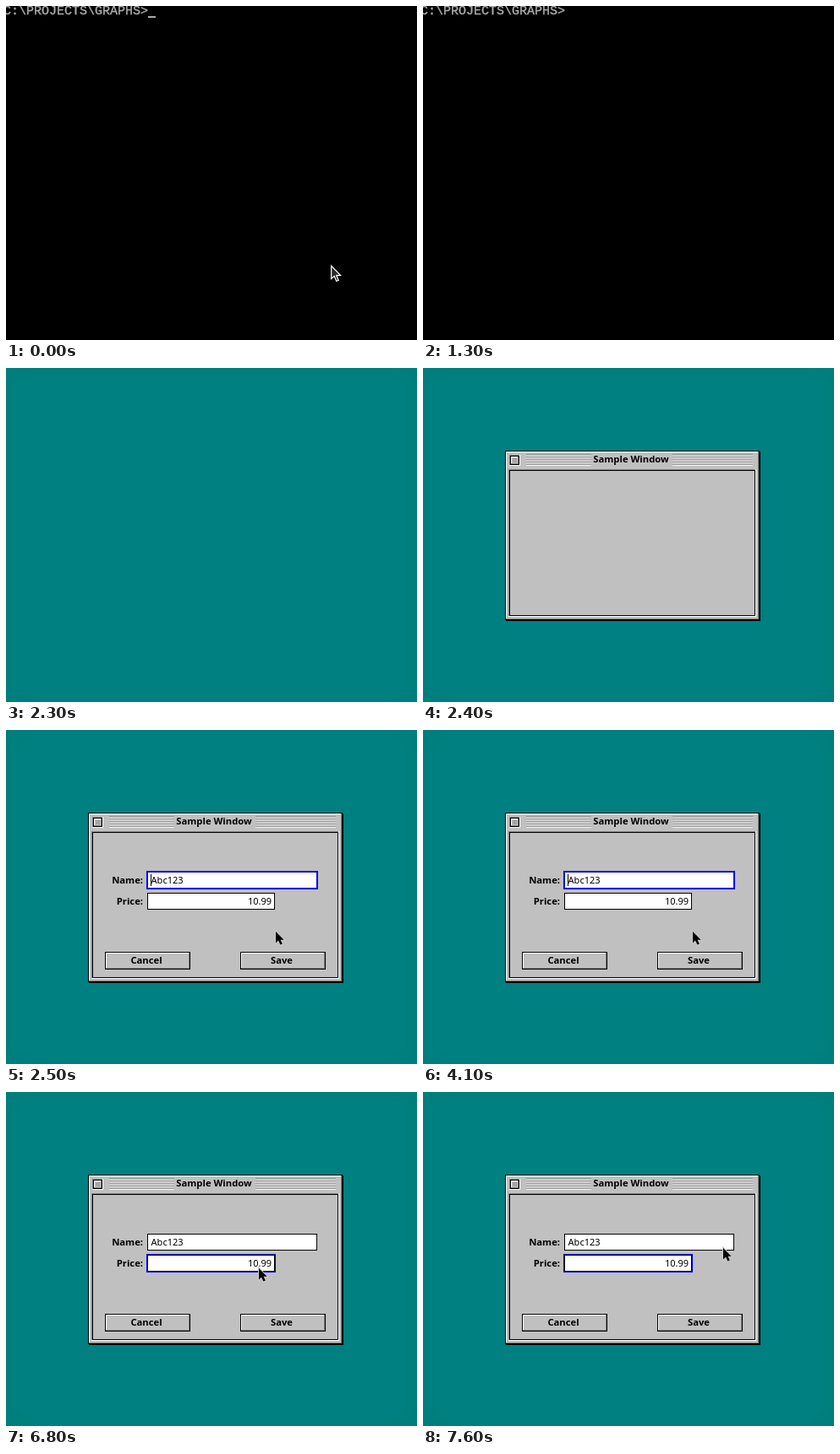
An HTML page for the animation above (8 s loop, 486 px wide and 396 px high).

```html
<!DOCTYPE html>
<html lang="en">
<head>
<meta charset="utf-8">
<title>Sample Window</title>
<style>
  html, body { margin: 0; width: 100%; height: 100%; overflow: hidden; background: #000; }
  svg { display: block; }
  #vignette { position: absolute; left: 0; top: 0; width: 486px; height: 396px; box-shadow: inset 0 0 20px rgba(0, 0, 0, .04); }
  .dos { font: 15px "Liberation Mono", monospace; fill: #aaa; stroke: #aaa; stroke-width: .4; }
  .label { font: bold 11.25px "Noto Sans", sans-serif; }
  .value { font: 11px "Noto Sans", sans-serif; }
  .middle { text-anchor: middle; }
  .end { text-anchor: end; }
</style>
</head>
<body>
<svg width="486" height="396" viewBox="0 0 486 396">
  <g id="dos">
    <text class="dos" x="-3" y="10">C:\PROJECTS\GRAPHS&gt;</text>
    <text class="dos" id="command" x="168" y="10">DEMO</text>
    <rect id="cursor" y="12" width="9" height="2" fill="#aaa"/>
    <path id="dosPointer" transform="translate(384 307)" fill="#2a2a2a" stroke="#fff" stroke-width="1.2"
      d="M.6 1V16.5L4.2 13.2L6.8 19.2L9.2 18.2L6.7 12.3H11.6Z"/>
  </g>
  <path id="strip" fill="#008080" d="M0 0H486V27H477V28H0Z"/>
  <rect id="desktop" width="486" height="396" fill="#008080"/>
  <g id="window" shape-rendering="crispEdges"></g>
  <g id="content" shape-rendering="crispEdges"></g>
  <path id="pointer" fill="#000" stroke="#c8c8c8" stroke-width="2" paint-order="stroke"
    d="M0 0V13.5L3 10.6L5.4 15.5L7.8 14.5L5.5 9.7H9.6Z"/>
</svg>
<div id="vignette"></div>
<script>
const LOOP = 8000, STEP = 100;
const el = id => document.getElementById(id);
const show = (id, on) => { el(id).style.display = on ? '' : 'none'; };

const rect = (x, y, w, h, fill, id = '') =>
  `<rect ${id && `id="${id}"`} x="${x}" y="${y}" width="${w}" height="${h}" fill="${fill}"/>`;
const text = (x, y, cls, str) => `<text x="${x}" y="${y}" class="${cls}">${str}</text>`;

// Box with a lit top left edge and a shaded bottom right edge.
const bevel = (x, y, w, h, light = '#fff', dark = '#808080') =>
  rect(x, y, w, h, dark) + rect(x, y, w - 1, h - 1, light) + rect(x + 1, y + 1, w - 2, h - 2, '#c0c0c0');
const sunken = (x, y, w, h) => bevel(x, y, w, h, '#808080', '#fff');

const framed = (x, y, w, h) => rect(x, y, w, h, '#000') + bevel(x + 1, y + 1, w - 2, h - 2);

const border = (x, y, w, h) => rect(x, y, w, h, '#000');
const focusRing = (id, x, y, w, h) => rect(x - 1, y - 1, w + 2, h + 2, '#0000dc', id);
const paper = (x, y, w, h) => rect(x + 1, y + 1, w - 2, h - 2, '#fff');

const button = (x, label) =>
  framed(x, 263, 101, 21) + text(x + 49, 277, 'label middle', label);

function stripes(x, width) {
  let out = '';
  for (let y = 102; y < 115; y += 2)
    out += rect(x, y, width, 1, '#808080') + rect(x, y + 1, width, 1, '#fff');
  return out;
}

const nameBox = [167, 168, 201, 20], priceBox = [167, 193, 151, 20];

el('window').innerHTML =
  rect(98, 99, 301, 201, '#000') + framed(97, 98, 301, 201) +
  stripes(122, 77) + stripes(295, 95) +
  text(246, 112, 'label middle', 'Sample Window') +
  sunken(102, 103, 13, 13) + rect(103, 104, 11, 11, '#000') +
  bevel(104, 105, 9, 9) + rect(106, 107, 5, 5, '#a4a4a4') +
  sunken(101, 120, 293, 175) +
  rect(102, 121, 291, 173, '#000') + rect(103, 122, 289, 171, '#c0c0c0');

el('content').innerHTML =
  text(162, 182, 'label end', 'Name:') + text(162, 207, 'label end', 'Price:') +
  border(...nameBox) + focusRing('nameFocus', ...nameBox) + paper(...nameBox) +
  focusRing('priceFocus', ...priceBox) + border(...priceBox) + paper(...priceBox) +
  text(171.6, 182, 'value', 'Abc123') + text(314, 207, 'value end', '10.99') +
  rect(171, 171, 1, 14, '#000', 'caret') +
  button(117, 'Cancel') + button(277, 'Save');

const caretToggles = [2500, 3200, 3700, 3800, 4100, 4400, 5000, 5300, 5600, 5900, 6200, 6500];

// Pointer path: time, x, y
const path = [[4900, 319, 239], [5400, 297, 217], [5800, 298, 210], [6300, 298, 209], [6750, 298, 209], [7600, 355, 185]];

function pointerAt(t) {
  const next = path.findIndex(p => p[0] > t);
  if (next === 0) return path[0].slice(1);
  if (next < 0) return path[path.length - 1].slice(1);
  const [t0, x0, y0] = path[next - 1], [t1, x1, y1] = path[next];
  const u = (t - t0) / (t1 - t0), k = u * u * (3 - 2 * u);
  return [Math.round(x0 + (x1 - x0) * k), Math.round(y0 + (y1 - y0) * k)];
}

function draw(now) {
  const t = Math.floor(now % LOOP / STEP) * STEP;
  const typed = t >= 1700;
  show('dos', t < 2100);
  show('command', typed);
  show('cursor', t < 100 || Math.floor((t - 100) / 200) % 2 === 1);
  el('cursor').setAttribute('x', typed ? 204 : 168);
  show('dosPointer', t < 600);

  show('strip', t === 2200);
  show('desktop', t >= 2300);
  show('vignette', t >= 2300);
  show('window', t >= 2400);
  show('content', t >= 2500);
  show('pointer', t >= 2500);

  show('nameFocus', t < 6500);
  show('priceFocus', t >= 6600);
  show('caret', caretToggles.filter(time => time <= t).length % 2);
  el('pointer').setAttribute('transform', `translate(${pointerAt(t)})`);
}

const start = performance.now();
function tick() {
  draw(performance.now() - start);
  requestAnimationFrame(tick);
}
tick();
</script>
</body>
</html>
```
